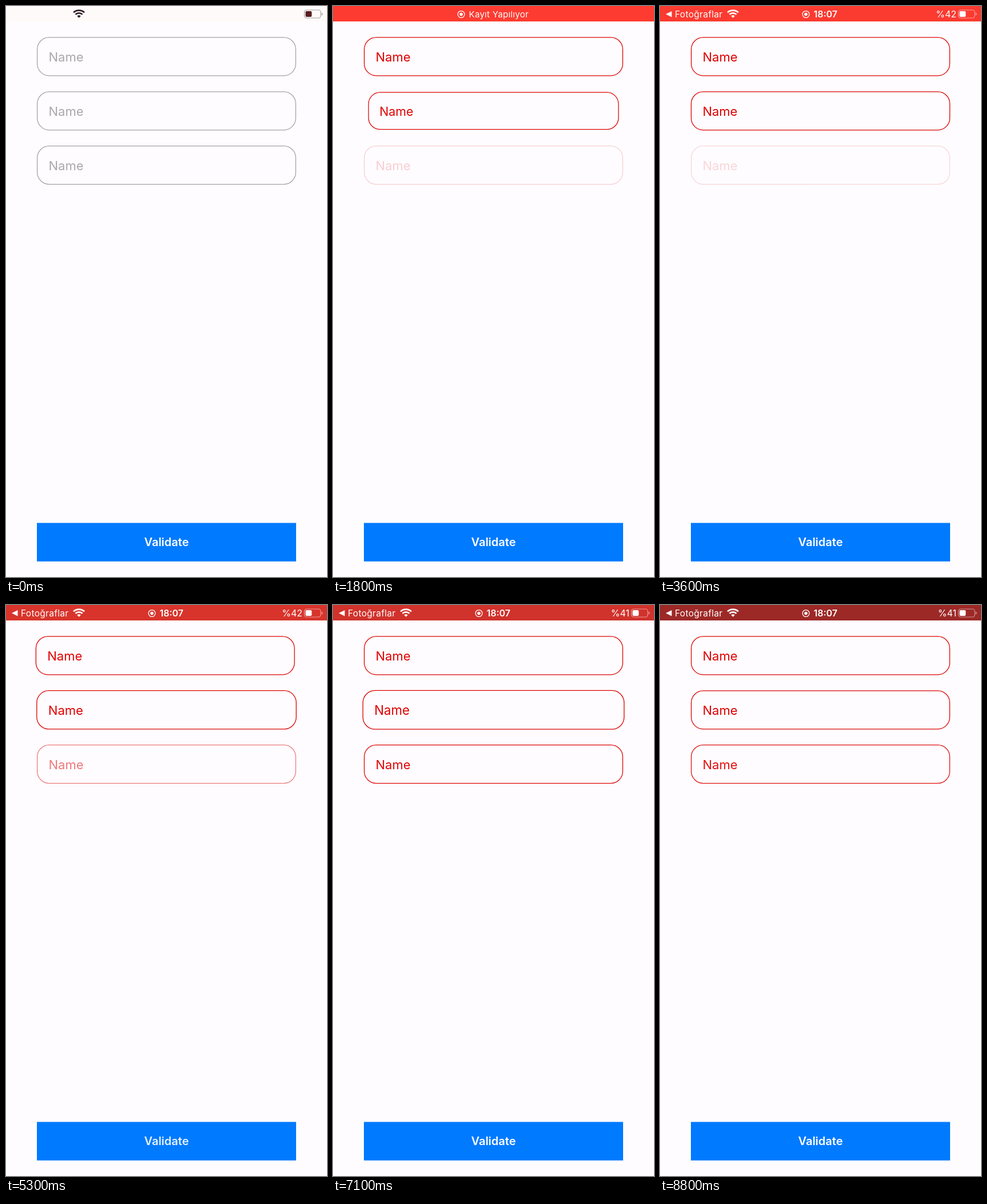
Write an HTML page that moves like this. It is 561x998 px and loops after 8900 ms.

```html
<!DOCTYPE html>
<html lang="tr">
<head>
<meta charset="utf-8">
<style>
html, body { margin: 0; width: 100%; height: 100%; overflow: hidden; background: #fefcff; }
svg { display: block; width: 561px; height: 998px; }
text { font-family: Inter, Roboto, sans-serif; }
.status { font-size: 15.5px; letter-spacing: .3px; }
.bold { font-size: 16px; font-weight: 600; letter-spacing: 0; }
</style>
</head>
<body>
<svg viewBox="0 0 561 998">
  <rect width="561" height="998" fill="#fefcff"/>
  <rect id="bar" width="561" height="27"/>

  <g id="recording" class="status" fill="#fff">
    <circle cx="224" cy="14.5" r="5.9" fill="none" stroke="#fff" stroke-width="1.3"/>
    <circle cx="224" cy="14.5" r="2.8"/>
    <text x="237.5" y="20" style="font-size:15px">Kayıt Yapılıyor</text>
  </g>

  <g id="clock" class="status" fill="#fff">
    <path d="M10 14.3 20.5 9V19.6Z"/>
    <text x="26" y="20">Fotoğraflar</text>
    <circle cx="255" cy="14.5" r="5.9" fill="none" stroke="#fff" stroke-width="1.3"/>
    <circle cx="255" cy="14.5" r="2.8"/>
    <text class="bold" x="268.5" y="20">18:07</text>
    <text id="percent" x="518" y="20" text-anchor="end" style="font-size:16px;letter-spacing:0"></text>
  </g>

  <g id="wifi" fill="none" stroke-width="2.7">
    <path d="M118 11.3A14 14 0 0 1 137 11.3"/>
    <path d="M121.4 14.8A9 9 0 0 1 133.6 14.8"/>
    <path d="M127.5 20.8 124.2 17.5A4.8 4.8 0 0 1 130.8 17.5Z" stroke="none"/>
  </g>
  <g id="battery">
    <rect id="shell" x="521.5" y="7" width="28.5" height="14" rx="4" fill="none" stroke-width="1.2"/>
    <path id="nub" d="M551.6 11.5Q553.6 12 553.6 14T551.6 16.5Z"/>
    <rect id="charge" x="523.5" y="9" width="10.8" height="10" rx="2"/>
  </g>

  <g id="fields"></g>

  <rect x="54" y="903.5" width="453" height="67.3" fill="#007aff"/>
  <text id="title" x="280.5" y="944" text-anchor="middle" font-size="20" font-weight="600" fill="#fff">Validate</text>
</svg>

<script>
const LOOP = 8900, STEP = 100, PT = 561 / 375;
const TAPS = [1180, 2130, 3130, 4130, 5135, 6080, 7757];
const PRESS = 130;
const $ = id => document.getElementById(id);
const set = (el, attrs) => { for (const k in attrs) el.setAttribute(k, attrs[k]); };
const clamp = x => Math.max(0, Math.min(1, x));
const mix = (a, b, p) => a + (b - a) * p;

function makeField(y) {
  const g = document.createElementNS("http://www.w3.org/2000/svg", "g");
  g.innerHTML = `<rect x="54.6" y="${y}" width="451.8" height="67" rx="21" fill="none" stroke-width="1.3"/>
    <text x="74.5" y="${y + 42.3}" font-size="22">Name</text>`;
  $("fields").append(g);
  return g;
}
const fields = [54.8, 149.8, 244.6].map(makeField);
const [shaken, pulsed, flashed] = fields;

// CSS-like "ease" curve (.25, .1, .25, 1)
function ease(x) {
  const curve = (a, b, s) => 3 * a * s * (1 - s) ** 2 + 3 * b * s * s * (1 - s) + s ** 3;
  let lo = 0, hi = 1;
  for (let i = 0; i < 24; i++) {
    const mid = (lo + hi) / 2;
    if (curve(.25, .25, mid) < x) lo = mid; else hi = mid;
  }
  return curve(.1, 1, lo);
}

// Progress of an auto-reversing animation, in seconds, or null once it is over
function yoyo(u, dur, count) {
  if (u < 0 || u >= 2 * dur * count) return null;
  const p = u / dur % 2;
  return p > 1 ? 2 - p : p;
}

function shake(u) {
  const p = yoyo(u, .1, 2);
  return p === null ? 0 : mix(-5, 5, p) * PT;
}

function pulse(u) {
  const p = yoyo(u, .6, 2);
  if (p === null) return 1;
  const s = p * .6;
  return 1 - .05 * Math.exp(-.5 * s) * Math.cos(10 * s);
}

function flash(u) {
  const p = yoyo(u, .5, 3);
  return p === null ? 1 : mix(1, .15, ease(p));
}

function drawStatus(t) {
  const start = t < 100;
  const glow = .5 + .5 * Math.cos(2 * Math.PI * (t - 3650) / 910);
  const red = [[128, 255], [36, 59], [36, 48]].map(([a, b]) => Math.round(mix(a, b, glow)));
  set($("bar"), { fill: start ? "#fefaf9" : `rgb(${red})` });

  const recording = !start && t < 3000;
  const icons = recording ? "none" : "inline";
  set($("recording"), { display: recording ? "inline" : "none" });
  set($("clock"), { display: start || recording ? "none" : "inline" });
  const ink = start ? "#30202b" : "#fff";
  set($("wifi"), { display: icons, stroke: ink, fill: "none" });
  set($("wifi").lastElementChild, { fill: ink });
  set($("battery"), { display: icons });
  const edge = start ? "#a5a0a4" : "rgba(255,255,255,.5)";
  set($("shell"), { stroke: edge });
  set($("nub"), { fill: edge });
  set($("charge"), { fill: start ? "#5a1c22" : "#fff" });
  $("percent").textContent = t < 6200 ? "%42" : "%41";
}

function drawForm(t) {
  const last = TAPS.filter(tap => tap <= t).pop();
  const u = last === undefined ? -1 : (t - last) / 1000;
  const invalid = u >= 0;
  for (const f of fields) {
    set(f.children[0], { stroke: invalid ? "#dc0500" : "#a3a2a5" });
    set(f.children[1], { fill: invalid ? "#e00000" : "#a9a8ab" });
  }
  const k = pulse(u);
  set(shaken, { transform: `translate(${shake(u)} 0)` });
  set(pulsed, { transform: `translate(280.5 183.3) scale(${k}) translate(-280.5 -183.3)` });
  set(flashed, { opacity: flash(u) });

  const pressed = TAPS.some(tap => t >= tap - PRESS && t < tap);
  const alpha = pressed ? .2 : invalid ? mix(.2, 1, clamp(u / .19)) : 1;
  set($("title"), { "fill-opacity": alpha });
}

function draw(now) {
  const t = Math.floor(now % LOOP / STEP) * STEP;
  drawStatus(t);
  drawForm(t);
}

const origin = performance.now();
function tick() {
  draw(performance.now() - origin);
  requestAnimationFrame(tick);
}
tick();
</script>
</body>
</html>
```
